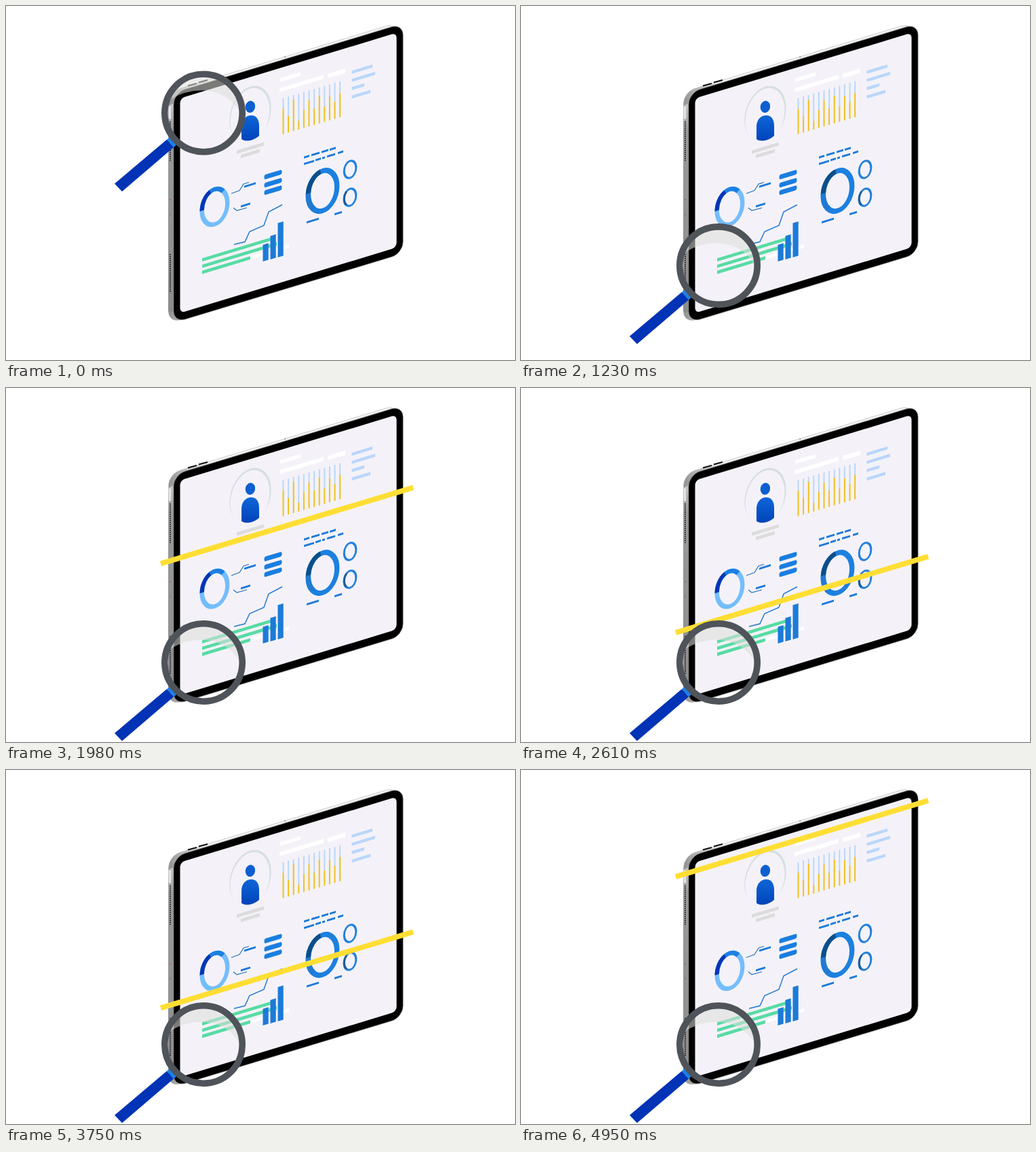
Recreate the animation shown at these times as an HTML page. Size 750 by 521 pixels, loop 5180 ms.

```html
<!DOCTYPE html>
<html lang="en">
<head>
<meta charset="utf-8">
<title>Tablet scan</title>
<style>
  html, body { margin: 0; width: 100%; height: 100%; overflow: hidden; background: #fff; }
  svg { display: block; width: 750px; height: 521px; }
</style>
</head>
<body>
<svg viewBox="0 0 750 521" xmlns="http://www.w3.org/2000/svg">
  <defs>
    <linearGradient id="side" x1="0" y1="0" x2="0" y2="1">
      <stop offset="0" stop-color="#c4c4c4"/>
      <stop offset=".12" stop-color="#9a9a9a"/>
      <stop offset="1" stop-color="#8c8c8c"/>
    </linearGradient>
    <linearGradient id="edge" gradientUnits="userSpaceOnUse" x1="239" y1="0" x2="300" y2="0">
      <stop offset="0" stop-color="#8f8f8f"/>
      <stop offset=".2" stop-color="#a8a8a8"/>
      <stop offset="1" stop-color="#f4f4f4"/>
    </linearGradient>
    <linearGradient id="person" x1="0" y1="0" x2="0" y2="1">
      <stop offset="0" stop-color="#0f66d8"/>
      <stop offset="1" stop-color="#0043b9"/>
    </linearGradient>
  </defs>
  <g id="plane" transform="matrix(1 -.302 0 1 0 77.3)"></g>
  <g id="flat"></g>
  <path id="beam" d="M228 157L600 45" stroke="#ffde34" stroke-width="7.8" visibility="hidden"/>
  <g id="glass">
    <path d="M160 261.5L237 196.5L247 208L171 273Z" fill="#0033b5"/>
    <path d="M237 196.5L242 192.5L252 203.5L247 208Z" fill="#1c80ea"/>
    <g transform="translate(291 157.5)">
      <path d="M-50 -19C-24 -37 28 -44 53 -2A53 53 0 0 0 -50 -19Z" fill="#dededa" fill-opacity=".55"/>
      <circle r="57.2" fill="none" stroke="#4f535a" stroke-width="9.6"/>
    </g>
  </g>
</svg>
<script>
const SLOPE = 0.302;
const BLUE = '#1c7ad9', SKY = '#bad6fb', GREEN = '#58dba4', PAPER = '#f4f2f8';
const plane = document.getElementById('plane');
const flat = document.getElementById('flat');

function add(parent, tag, attrs) {
  const el = document.createElementNS('http://www.w3.org/2000/svg', tag);
  for (const key in attrs) el.setAttribute(key, attrs[key]);
  parent.append(el);
  return el;
}

// Stage y at a given x, expressed in the slanted plane.
const local = (x, y) => y + SLOPE * x - 77.3;

function panel(x, y, width, height, rx, fill, extra) {
  add(plane, 'rect', { x, y, width, height, rx, fill, ...extra });
}

// Slanted bar from x1 to x2; y is the middle of its left end.
function bar(x1, x2, y, h, fill, rx = 0) {
  panel(x1, local(x1, y) - h / 2, x2 - x1, h, rx, fill);
}

function oval(x, y, rx, ry, attrs) {
  add(plane, 'ellipse', { cx: x, cy: local(x, y), rx, ry, fill: 'none', ...attrs });
}

// Ring with coloured arcs given as [start, end, colour] in degrees.
function ring(x, y, rx, ry, width, base, arcs = []) {
  oval(x, y, rx, ry, { stroke: base, 'stroke-width': width });
  const cy = local(x, y);
  const at = deg => {
    const a = deg * Math.PI / 180;
    return `${x + rx * Math.cos(a)} ${cy + ry * Math.sin(a)}`;
  };
  for (const [from, to, stroke] of arcs) {
    add(plane, 'path', {
      d: `M${at(from)}A${rx} ${ry} 0 0 1 ${at(to)}`,
      fill: 'none', stroke, 'stroke-width': width
    });
  }
}

function line(d, stroke, width, extra) {
  add(flat, 'path', { d, fill: 'none', stroke, 'stroke-width': width, ...extra });
}

function drawTablet() {
  panel(239.5, 121.5, 338, 340.5, 17, 'url(#edge)', { stroke: '#bdbdbd', 'stroke-width': .7 });
  panel(239, 141, 14, 306, 4, 'url(#side)');
  panel(247, 125, 338, 338.5, 17, '#000', { stroke: '#777', 'stroke-width': .7 });
  panel(256.5, 136, 319, 316, 7, PAPER);

  line('M268 117.5L281 114M284 112.5L297 109', '#111', 2);
  line('M241.5 149V165', '#e4e4e4', 3.4, { 'stroke-linecap': 'round' });
  line('M242 170V228M242 365V422', '#222', 2, { 'stroke-dasharray': '1.6 1.4' });
  line('M241.5 285h1.5', '#b04a4a', 1.5);
  line('M241.5 307h1.5', '#4c7a66', 1.5);
  line('M410.5 75h1.5', '#777', 1.5);
}

function drawProfile() {
  oval(360, 159, 30.8, 40.5, { fill: '#d8dfe1' });
  oval(359.5, 161.8, 29, 40, { fill: PAPER });
  add(flat, 'ellipse', { cx: 360, cy: 148.3, rx: 7.2, ry: 8.8, fill: '#0d5fd0', transform: 'rotate(12 360 148)' });
  add(flat, 'path', {
    d: 'M347 196V178C347 168 353 161.5 360 161C368 160 373 166 373 176V191C366 197.5 354 201 347 196Z',
    fill: 'url(#person)'
  });
  bar(340, 380, 215, 5, '#dcdcdc');
  bar(346, 374, 221.5, 5, '#dcdcdc');
}

function drawColumns() {
  bar(404, 434, 109, 5.5, '#fff');
  bar(403, 468, 124, 6, '#fff');
  bar(474, 500, 103, 6.5, '#fff');
  const tops = [151, 162, 138, 169, 153, 139, 151, 132, 148, 133, 141, 128];
  tops.forEach((top, i) => {
    const x = 408.5 + i * 7.6;
    const y = 135.5 - i * 2.25;
    line(`M${x} ${y}V${top}`, SKY, 2);
    line(`M${x} ${top}V${y + 53}`, '#f0c020', 2);
  });
  [[540, 97.5], [544, 109.5], [528, 121.5], [537, 134]].forEach(([x2, y]) => bar(509.5, x2, y, 4.5, SKY));
}

function drawLeftCharts() {
  ring(307.5, 295.5, 18.8, 25.8, 6.4, '#74bdfc', [[180, 250, '#0236b8'], [250, 312, '#1c80e2']]);
  line('M332 276L344 271.5L350 262L358 259.5M335 297L340 301L355 297', '#2a72b8', 1.2);
  bar(351, 368, 266, 3, BLUE);
  bar(346, 360, 295, 3, BLUE);
  for (const y of [252, 264, 275]) bar(380.5, 406.5, y, 7, '#1a7ee0', 2.5);

  [[390, 373.7], [399, 383.2], [360, 392]].forEach(([x2, y]) => bar(289, x2, y, 4.8, GREEN));
  bar(360, 417, 370.5, 5, '#fff');
  line('M336 351L352 347L359 332L380 323L387 303L407 292.5', '#2679d6', 1.5);
  [[378.5, 351.5, 376], [389.5, 338.5, 373], [400.5, 319.5, 370]].forEach(([x, top, end]) =>
    bar(x, x + 8.2, (top + end) / 2, end - top, BLUE));
}

function drawRightCharts() {
  const dashes = [
    [439, 447, 223], [450, 462, 219.5], [465, 475, 215], [477, 486, 211.5],
    [439, 454, 232.5], [456, 464, 227], [466, 470, 224], [473, 485, 221.5], [489, 497, 216.5],
    [443, 461, 318.5], [484, 495, 306.5]
  ];
  for (const [x1, x2, y] of dashes) bar(x1, x2, y, 3, BLUE);
  ring(466.5, 272, 21.2, 29.3, 7.4, '#1c80e0', [[130, 185, '#207ad2'], [185, 262, '#0b4f8a']]);
  ring(507, 240.5, 8.8, 12.4, 3, '#2180dc');
  ring(507, 281.5, 8.8, 12.4, 3, '#2180dc', [[130, 235, '#195d9c']]);
}

drawTablet();
drawProfile();
drawColumns();
drawLeftCharts();
drawRightCharts();

// The glass slides down, then the beam sweeps down and back up.
const LOOP = 5180, STEP = 30;
const GLASS_END = 1350, BEAM_TURN = 3150, BEAM_END = 4950;
const GLASS_DROP = 246.5, BEAM_DROP = 290;
const glass = document.getElementById('glass');
const beam = document.getElementById('beam');
const start = performance.now();

function render() {
  const elapsed = Math.max(0, performance.now() - start) % LOOP;
  const t = Math.min(BEAM_END, Math.floor(elapsed / STEP) * STEP);
  const drop = GLASS_DROP * Math.min(1, t / GLASS_END);
  const sweep = BEAM_DROP * (1 - Math.abs(t - BEAM_TURN) / (BEAM_END - BEAM_TURN));
  glass.setAttribute('transform', `translate(0 ${drop})`);
  beam.setAttribute('transform', `translate(0 ${sweep})`);
  beam.setAttribute('visibility', t >= GLASS_END ? 'visible' : 'hidden');
  requestAnimationFrame(render);
}
render();
</script>
</body>
</html>
```
